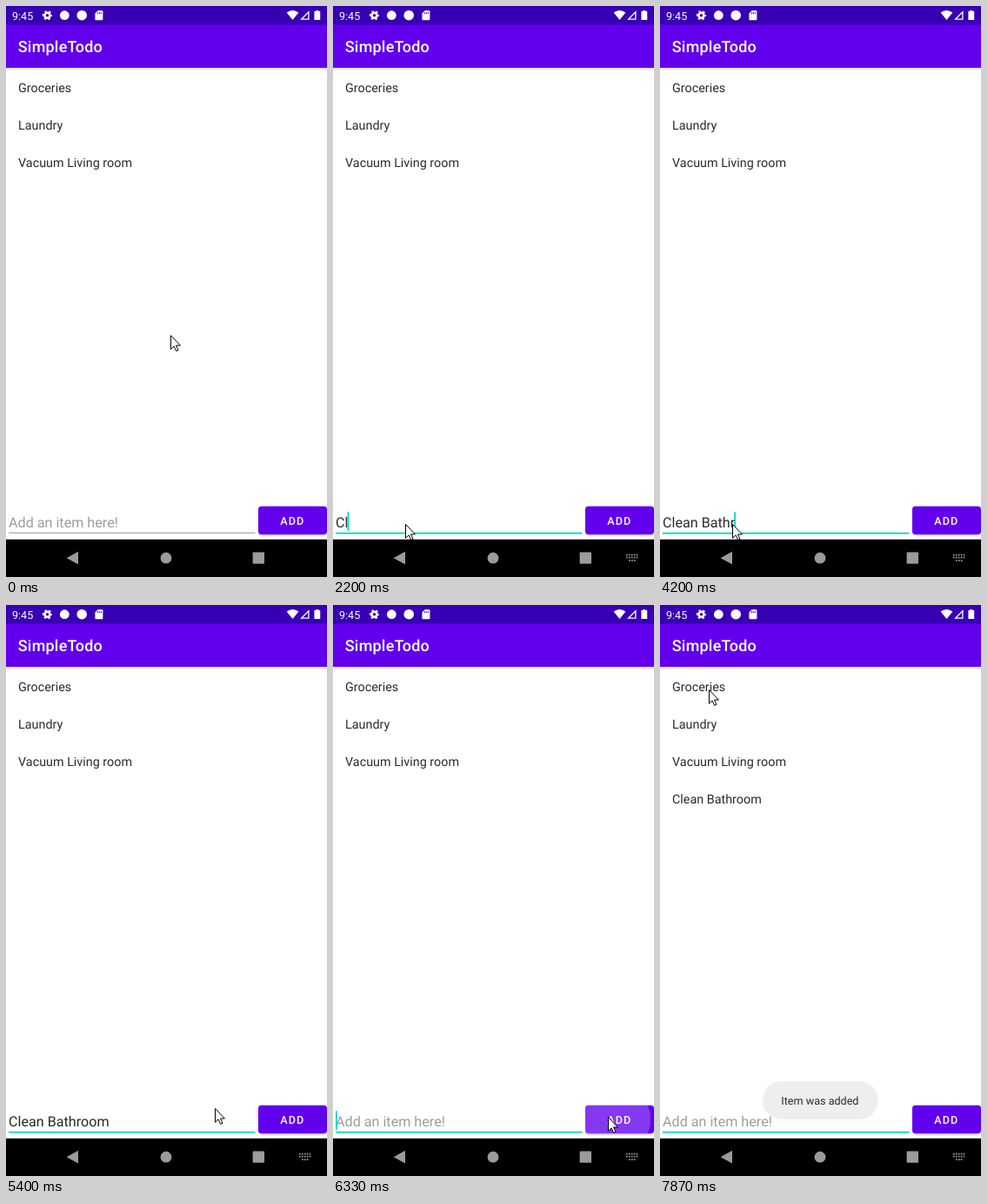
An HTML page for the animation above (8000 ms loop, 369x656 px).

```html
<!DOCTYPE html>
<html lang="en">
<head>
<meta charset="utf-8">
<title>SimpleTodo</title>
<style>
  html, body { margin: 0; width: 100%; height: 100%; overflow: hidden; background: #fff; }
  svg { display: block; width: 100%; height: 100%; }
  text { font-family: Roboto, sans-serif; white-space: pre; text-rendering: geometricPrecision; }
  .medium { font-weight: 500; fill: #fff; }
  .list { font-size: 14.36px; fill: #2a2a2a; }
  .field { font-size: 16.15px; fill: #2a2a2a; }
  #hint { fill: #9c9c9c; }
  .nav { fill: #9b9b9b; }

  #pointer, #ripple, #toast { animation: 8s linear infinite; }
  #pointer { animation-name: point; }
  #ripple { animation-name: ripple; transform-origin: 321px 591px; fill: #fff; }
  #toast { animation-name: toast; }

  /* Each segment is stepped at 15 frames per second. */
  @keyframes point {
    0% { transform: translate(189px, 378px); animation-timing-function: steps(4); }
    3.3% { transform: translate(162px, 432px); animation-timing-function: steps(4); }
    6.6% { transform: translate(97px, 568px); animation-timing-function: steps(3); }
    9.1% { transform: translate(83px, 595px); }
    65.8% { transform: translate(83px, 595px); animation-timing-function: steps(2); }
    67.4% { transform: translate(240px, 578px); animation-timing-function: steps(3); }
    69.9% { transform: translate(285px, 588px); animation-timing-function: steps(4); }
    73.3% { transform: translate(306px, 601px); animation-timing-function: steps(4); }
    76.6% { transform: translate(316px, 588px); }
    85% { transform: translate(316px, 588px); animation-timing-function: steps(3); }
    87.4% { transform: translate(302px, 589px); }
    89.1% { transform: translate(302px, 589px); animation-timing-function: steps(6); }
    94.1% { transform: translate(52px, 110px); }
    96.6% { transform: translate(52px, 110px); animation-timing-function: steps(2); }
    98.3%, 100% { transform: translate(56px, 97px); }
  }
  @keyframes ripple {
    0% { opacity: 0; animation-timing-function: step-end; }
    78.3% { opacity: .2; transform: scale(.6); animation-timing-function: step-end; }
    79.1% { opacity: .22; transform: scale(1); animation-timing-function: step-end; }
    79.9% { opacity: .22; transform: scale(1.3); animation-timing-function: steps(5); }
    84.1%, 100% { opacity: 0; transform: scale(1.3); }
  }
  @keyframes toast {
    0%, 80% { opacity: 0; animation-timing-function: steps(5); }
    84.1%, 100% { opacity: 1; }
  }
</style>
</head>
<body>
<svg viewBox="0 0 369 656">
  <defs>
    <linearGradient id="shade" x2="0" y2="1">
      <stop stop-opacity=".16"/>
      <stop offset="1" stop-opacity="0"/>
    </linearGradient>
    <clipPath id="buttonShape"><rect x="290" y="574.7" width="79" height="32.4" rx="3.6"/></clipPath>
    <filter id="blur"><feGaussianBlur stdDeviation=".8"/></filter>
  </defs>

  <rect width="369" height="656" fill="#fff"/>
  <rect y="71" width="369" height="3.5" fill="url(#shade)"/>
  <rect y="21" width="369" height="50" fill="#6200ee"/>
  <rect width="369" height="21.4" fill="#3700b3"/>

  <!-- Status bar -->
  <g fill="#fff">
    <text x="7" y="15.5" font-size="12.56">9:45</text>
    <circle cx="47.5" cy="10.7" r="3" fill="none" stroke="#fff" stroke-width="2.6"/>
    <circle cx="47.5" cy="10.7" r="4.8" fill="none" stroke="#fff" stroke-width="1.6" stroke-dasharray="2.5 2.527" stroke-dashoffset="1.25"/>
    <circle cx="67.3" cy="10.7" r="5.4"/>
    <circle cx="87.2" cy="10.7" r="5.8"/>
    <path d="M105.6 5.2H110.4Q111.4 5.2 111.4 6.2V15.2Q111.4 16.2 110.4 16.2H103.4Q102.4 16.2 102.4 15.2V8.4Z"/>
    <path d="M105.3 7.2v2M107.3 7.2v2M109.3 7.2v2" stroke="#3700b3"/>
    <path d="M322.6 7.4Q329.5 2.4 336.4 7.4L329.5 15.9Z"/>
    <path d="M339.6 15.2 347.9 6.8V15.2Z" fill="none" stroke="#fff" stroke-width="1.3"/>
    <path d="M356.4 4.9h2.8v1.2h2v10h-6.8v-10h2Z"/>
  </g>
  <text class="medium" x="13.8" y="53.3" font-size="17.95" letter-spacing=".22">SimpleTodo</text>

  <g class="list">
    <text x="14" y="98.6">Groceries</text>
    <text x="14" y="141.7">Laundry</text>
    <text x="14" y="184.8">Vacuum Living room</text>
    <text x="14" y="227.8" id="newItem">Clean Bathroom</text>
  </g>

  <!-- Input row -->
  <rect id="line" x="3" y="604.8" width="283.5"/>
  <text class="field" id="hint" x="3" y="598.7">Add an item here!</text>
  <text class="field" id="typed" x="3" y="598.7"></text>
  <rect id="caret" y="581.3" width="1.8" height="21.6" fill="#03dac5"/>

  <rect x="291" y="578" width="77" height="30.2" rx="3.6" opacity=".35" filter="url(#blur)"/>
  <g clip-path="url(#buttonShape)">
    <rect x="290" y="574" width="79" height="34" fill="#6200ee"/>
    <circle id="ripple" cx="321" cy="591" r="44"/>
  </g>
  <text class="medium" x="315.2" y="596" font-size="12.56" letter-spacing="1.12">ADD</text>

  <!-- Navigation bar -->
  <rect y="612.8" width="369" height="43.2"/>
  <g class="nav">
    <path d="M69.6 634.2 83 626.8V641.6Z"/>
    <circle cx="184" cy="634.2" r="6.4"/>
    <rect x="283.6" y="627.6" width="13.4" height="13.2" rx=".8"/>
    <path id="keyboard" d="M337 630.6H351M337 633.6H351M340 637.2H348" fill="none" stroke="#9b9b9b" stroke-width="1.7" stroke-dasharray="1.7 1.2"/>
  </g>

  <g id="toast">
    <rect x="118" y="547" width="132.5" height="44" rx="21.5" fill="#eee"/>
    <text x="139.3" y="574.4" font-size="12.6" fill="#2a2a2a">Item was added</text>
  </g>

  <path id="pointer" d="M.5.5V16.3L4.1 12.9 6.7 18.4 9 17.4 6.5 12H11.4Z" fill="#fff" stroke="#000" stroke-width="1" stroke-linejoin="round"/>
</svg>

<script>
  const LOOP = 8000;
  // Field contents from each moment on; a trailing bar is the visible caret.
  const fieldStates = [
    [0, ''], [1000, '|'], [1530, ''], [2000, 'C|'], [2200, 'Cl|'], [2330, 'Cle|'],
    [2400, 'Clea|'], [2530, 'Cleam|'], [2800, 'Clea|'], [3000, 'Clean|'],
    [3200, 'Clean |'], [3670, 'Clean '], [3730, 'Clean B|'], [3870, 'Clean Ba|'],
    [4070, 'Clean Bat|'], [4130, 'Clean Bath|'], [4200, 'Clean Bathr|'],
    [4400, 'Clean Bathro|'], [4530, 'Clean Bathroo|'], [4670, 'Clean Bathroom|'],
    [5130, 'Clean Bathroom'], [5670, 'Clean Bathroom|'], [6130, 'Clean Bathroom'],
    [6330, '|'], [6870, ''], [7330, '|'], [7870, '']
  ];
  const byId = id => document.getElementById(id);
  const [line, hint, typed, caret, newItem, keyboard] =
    ['line', 'hint', 'typed', 'caret', 'newItem', 'keyboard'].map(byId);
  const show = (el, on) => { el.style.visibility = on ? 'visible' : 'hidden'; };

  function draw(t) {
    const state = fieldStates.findLast(([from]) => from <= t)[1];
    const text = state.replace('|', '');
    const focused = t >= 930;

    typed.textContent = text;
    show(hint, !text);
    show(caret, state.endsWith('|'));
    caret.setAttribute('x', text ? 2.1 + typed.getComputedTextLength() : 3);

    line.setAttribute('fill', focused ? '#03dac5' : '#969696');
    line.setAttribute('height', focused ? 1.8 : 1);
    show(keyboard, t >= 1000);
    show(newItem, t >= 6400);
  }

  let start;
  function tick(now) {
    start ??= now;
    draw((now - start) % LOOP);
    requestAnimationFrame(tick);
  }
  draw(0);
  requestAnimationFrame(tick);
</script>
</body>
</html>
```
